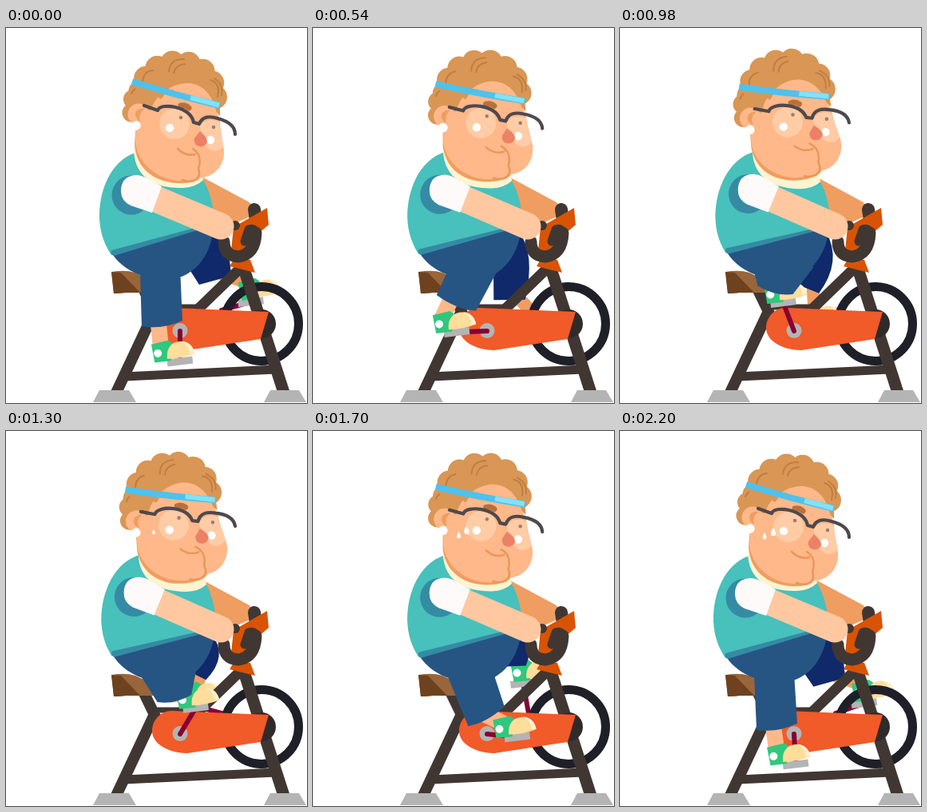
Animation of 377x469 px, one loop 2.22 s. Source, as an HTML page:

```html
<!DOCTYPE html>
<html lang="en">
<head>
<meta charset="utf-8">
<title>Exercise bike</title>
<style>
html, body { margin: 0; width: 100%; height: 100%; overflow: hidden; background: #fff; }
svg { display: block; width: 100vw; height: 100vh; }
.line { fill: none; stroke-linecap: round; stroke-linejoin: round; }
.flat { fill: none; }
</style>
</head>
<body>
<svg viewBox="0 0 377 469">
  <defs>
    <g id="shoe">
      <path fill="#2fc87c" d="M-35-11L-13-14L-6-8L-13 12L-33 12Z"/>
      <circle cx="-28" cy="1" r="5" fill="#fff"/>
      <path fill="#ffdd9b" d="M-17 9C-17-5-9-11 0-11C10-11 17-4 18 6Q0 11-17 9Z"/>
      <path fill="#fff0cd" d="M3-11C12-10 17-3 18 5L12 6Q12-6 3-11Z"/>
    </g>
    <rect id="pedal" x="-16" y="-4.5" width="32" height="9" fill="#b4b4b4"/>
  </defs>

  <!-- far leg -->
  <path id="farCrank" class="line" stroke="#850034" stroke-width="6"/>
  <use id="farPedal" href="#pedal"/>
  <path id="farShin" class="line" stroke="#f09d61" stroke-width="16"/>
  <use id="farShoe" href="#shoe"/>
  <path id="farShorts" fill="#10296b"/>

  <!-- bike -->
  <circle cx="320" cy="370" r="46.5" fill="none" stroke="#1e1f27" stroke-width="11"/>
  <g fill="none" stroke="#403733">
    <path stroke-width="15" d="M297 298L348 456"/>
    <path stroke-width="13" d="M297 297L238 354"/>
    <path stroke-width="7" d="M184 349H244"/>
    <path stroke-width="14" d="M172 326L189 361"/>
    <path stroke-width="14" d="M187 352L138 456"/>
    <path stroke-width="11" d="M148 436L338 427"/>
  </g>
  <circle cx="320" cy="370" r="18" fill="#302b2b"/>
  <path fill="#b4b4b4" d="M117 453H154L163 468H109ZM331 453H367L376 468H323Z"/>
  <path fill="#f15a29" d="M209 350L329 355L319 389L227 403C205 403 183 392 183 375C183 362 194 349 209 350Z"/>
  <path fill="#99653a" d="M132 305Q150 302 162 306Q180 315 190 313V331H150Q140 332 135 332Z"/>
  <path fill="#6f421f" d="M132 305L144 306L168 331H150Q140 332 135 332Z"/>

  <!-- near leg -->
  <circle cx="218" cy="378.500" r="9.500" fill="#b4b4b4"/>
  <path id="nearCrank" class="line" stroke="#850034" stroke-width="6"/>
  <use id="nearPedal" href="#pedal"/>
  <path id="nearShin" class="line" stroke="#ffb88a" stroke-width="20"/>
  <use id="nearShoe" href="#shoe"/>
  <path id="nearShorts" fill="#265583"/>

  <!-- torso -->
  <path id="farArm" fill="#f09d61"/>
  <g id="torso">
    <path fill="#265583" d="M132 281C146 303 172 315 205 314C238 312 260 280 260 243Z"/>
    <path fill="#48c0bc" d="M162 156C130 167 116 205 117 238C118 258 124 272 132 284L260 246C262 225 255 204 246 188Z"/>
    <path fill="#358ba3" d="M132 278L259 244L259 247L135 285Q130 283 132 278Z"/>
    <path fill="#fff4d2" d="M160 150C160 184 182 201 222 200Q238 199 247 190L240 160Z"/>
    <circle cx="157" cy="209" r="24.500" fill="#358ba3"/>
  </g>

  <!-- head -->
  <g id="head">
    <g id="hair" fill="#d99655">
      <ellipse cx="215" cy="82" rx="55" ry="46"/>
      <circle cx="159" cy="89" r="12"/>
      <circle cx="157" cy="106" r="11.500"/>
    </g>
    <g class="line" stroke="#bf7f42" stroke-width="2">
      <path d="M204 54Q206 38 223 39M210 56Q212 46 224 45"/>
      <path d="M256 65Q269 69 265 86M261 63Q273 71 270 84"/>
      <path d="M171 66Q173 54 184 53M157 82Q160 76 165 75"/>
    </g>
    <path fill="#ef9e61" d="M165 96L161 145C163 182 195 196 224 194Q240 193 243 184Z"/>
    <path fill="#ffb889" d="M165 96L162 143C166 172 192 191 220 191Q236 196 244 187C262 186 274 171 273 153C272 140 268 130 268 116L262 98C254 76 240 69 226 69Q206 70 192 86Z"/>
    <path fill="#d99655" d="M162 68L211 78Q200 78 196 87Q193 91 191 86Q185 92 181 103L164 102ZM262 96L268 97L268 110Q261 104 262 96Z"/>
    <circle cx="166" cy="108" r="13.500" fill="#ffb889"/>
    <path fill="#ef9e61" d="M174 101C160 99 159 112 168 117Q165 107 174 101Z"/>
    <circle cx="163" cy="122" r="5.800" fill="#fff"/>
    <path class="line" stroke="#e9975b" stroke-width="2.500" d="M215 151Q225 161 237 158M234 151C246 159 243 170 241 176Q245 187 235 191Q228 193 221 190"/>
    <path class="line" stroke="#b9713c" stroke-width="7" d="M219 97Q225 96 229 100"/>
    <g fill="#fff1d8" opacity=".36">
      <circle cx="211" cy="120" r="19"/>
      <path d="M243 121Q255 111 267 118Q268 132 273 148Q266 156 257 153Q243 146 243 121Z"/>
    </g>
    <g fill="#9b7d76"><circle cx="219" cy="112" r="2.300"/><circle cx="260" cy="124" r="2.300"/></g>
    <g fill="#fff"><circle cx="205" cy="125" r="5.200"/><circle cx="256" cy="140" r="5.200"/></g>
    <path fill="#ed8165" d="M243 129C248 134 252 137 252 142C251 147 246 149 242 148C237 147 235 143 236 138Z"/>
    <path class="line" stroke="#4e494d" stroke-width="4.200" d="M173 97L190 103C192 97 204 97 212 99C224 102 233 108 235 118L242 120C246 110 256 110 265 113C280 117 287 123 287 133"/>
    <path class="flat" stroke="#4fc1ec" stroke-width="8" d="M158 67Q212 84 268 97"/>
    <path class="flat" stroke="#80e2fb" stroke-width="6" d="M231 87Q250 92 267 96.500"/>
    <path id="dropA" fill="#fff" d="M0-5Q3 0 2.300 2A2.500 2.500 0 0 1-2.300 2Q-3 0 0-5Z"/>
    <path id="dropB" fill="#fff" d="M0-6Q4 0 3 2.500A3.200 3.200 0 0 1-3 2.500Q-4 0 0-6Z"/>
  </g>

  <!-- handlebar -->
  <path fill="#d95304" d="M286 288L306 290L312 306L280 298Z"/>
  <path class="line" stroke="#403733" stroke-width="16" d="M311 227L313 240"/>
  <path fill="#d95304" d="M285 249L327 225L329 246L308 264L300 280L282 278Z"/>
  <path class="line" stroke="#403733" stroke-width="15" d="M273 267Q273 285 291 286Q312 283 313 256"/>
  <path class="line" stroke="#403733" stroke-width="11" d="M313 258Q312 249 304 252L299 267"/>
  <circle cx="287" cy="247" r="6" fill="#403733"/>

  <!-- near arm -->
  <path id="arm" class="line" stroke="#ffc8a0" stroke-width="33"/>
  <path id="sleeve" fill="#fffafa" d="M144 204Q144 185 163 184Q170 184 178 189L195 198L183 231L156 222Q144 216 144 204Z"/>
</svg>
<script>
const LOOP = 2220;
const HIP = [195, 295];
const NECK = [196, 126];
const $ = id => document.getElementById(id);
const set = (id, name, value) => $(id).setAttribute(name, value);
const rad = deg => deg * Math.PI / 180;
const mix = (p, q, u) => p.map((v, i) => v + (q[i] - v) * u);

function spin([x, y], deg, [cx, cy]) {
  const c = Math.cos(rad(deg)), s = Math.sin(rad(deg));
  return [cx + (x - cx) * c - (y - cy) * s, cy + (x - cx) * s + (y - cy) * c];
}

function foot(side, [cx, cy], deg, [dx, dy], cuff, heel) {
  const px = cx + 38 * Math.cos(rad(deg)), py = cy + 38 * Math.sin(rad(deg));
  const sx = px + dx, sy = py + dy;
  set(side + "Crank", "d", `M${cx} ${cy}L${px} ${py}`);
  set(side + "Pedal", "transform", `translate(${px} ${py}) rotate(-7)`);
  set(side + "Shoe", "transform", `translate(${sx} ${sy}) rotate(-6)`);
  set(side + "Shin", "d", `M${cuff[0]} ${cuff[1] - 6}L${sx - heel} ${sy - 4}`);
}

function drop(id, t, start, from, to) {
  const u = Math.max(0, (t - start) / (LOOP - start));
  const size = Math.min(1, Math.max(0, (t - start) / 160));
  set(id, "transform", `translate(${mix(from, to, u * (2 - u))}) scale(${size})`);
}

function draw(t) {
  const turn = 360 * t / LOOP;
  const c = Math.cos(rad(turn)), s = Math.sin(rad(turn));
  const lean = (1 - c) / 2;
  const tilt = 2.4 * lean;

  // Each cuff corner rides an ellipse in step with the pedals.
  const back = [175 - 5 * c - 20 * s, 350 + 23 * c - 17 * s];
  const front = [222 - c - 18 * s, 348 + 18 * c + 5 * s];
  const knee = [230 - 12 * c + 4 * s, 299];
  const hem = mix(back, front, .5);
  set("nearShorts", "d", `M168 305L${back}Q${hem[0]} ${hem[1] + 8} ${front}L${knee}L210 280Z`);

  const farFront = [265 + 17 * c, 317 - 7 * c + 23 * s];
  const farBack = [234 + 8 * c - 8 * s, 317 + 4 * c + 23 * s];
  const farKnee = [279, 273 - 16 * c + 10 * s];
  set("farShorts", "d", `M225 270L258 255Q${farKnee} ${farFront}L${farBack}L226 296Z`);

  foot("near", [218, 379], 90 + turn, [6 - 6 * c, -14], mix(back, front, .4), 24);
  foot("far", [270, 353], 344 + turn, [20, -17], mix(farBack, farFront, .7), 16);

  set("torso", "transform", `rotate(${tilt} ${HIP})`);
  set("sleeve", "transform", `rotate(${tilt} ${HIP})`);
  set("head", "transform", `rotate(${-9.5 * lean} ${NECK})`);
  set("arm", "d", `M${spin([188, 214], tilt, HIP)}L269 248`);
  set("farArm", "d", `M${spin([245, 186], tilt, HIP)}L303 217Q312 222 308 235L285 245L250 225Z`);

  drop("dropA", t, 1180, [186, 123], [181, 132]);
  drop("dropB", t, 1440, [193, 121], [192, 127]);
}

// Curls around the crown.
for (let i = 0; i < 8; i++) {
  const a = rad(187 + i * 25);
  $("hair").innerHTML += `<circle cx="${215 + 47 * Math.cos(a)}" cy="${85 + 42 * Math.sin(a)}" r="15"/>`;
}

function frame() {
  draw(performance.now() % LOOP);
  requestAnimationFrame(frame);
}
frame();
</script>
</body>
</html>
```
